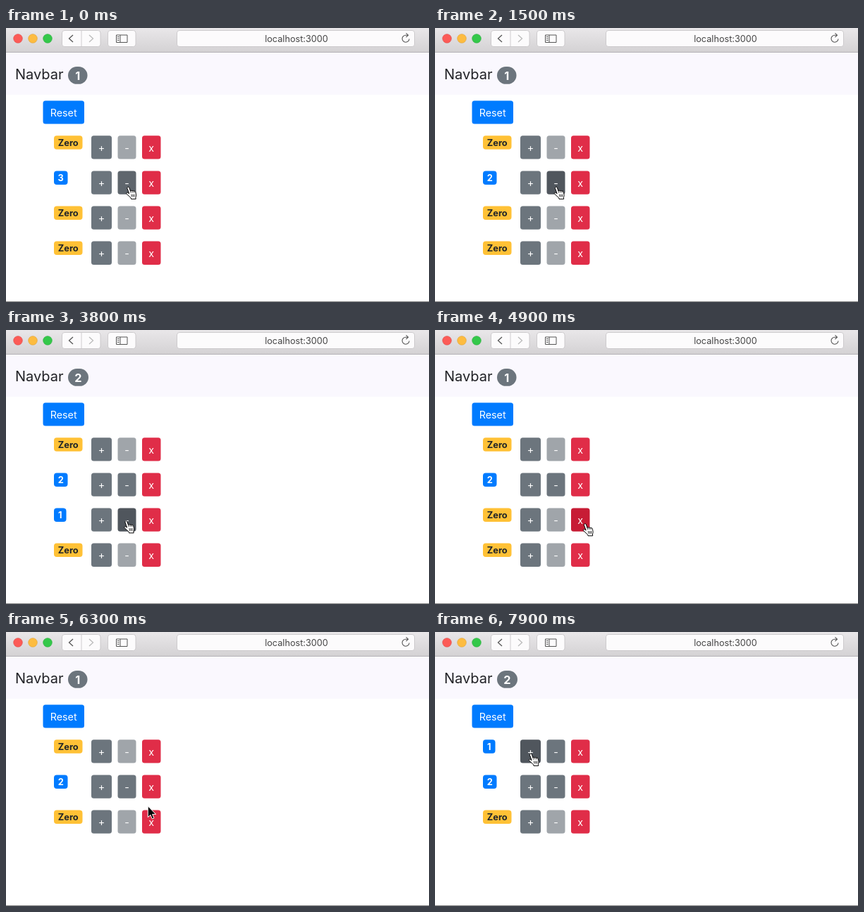
An HTML page that plays this animation: 600x390 px, repeating every 8 s.

```html
<!DOCTYPE html>
<html lang="en">
<head>
<meta charset="utf-8">
<title>Counters</title>
<style>
html, body { margin: 0; width: 100%; height: 100%; overflow: hidden; background: #fff; }
svg { display: block; width: 600px; height: 390px; font-family: Inter, sans-serif; cursor: default; }
.mid { text-anchor: middle; }
.btn { font-size: 14.3px; fill: #fff; text-anchor: middle; }
.bold { font-weight: 700; text-anchor: middle; }
.line { fill: none; stroke: #555; stroke-width: 1.3; }
</style>
</head>
<body>
<svg viewBox="0 0 600 390">
  <defs>
    <linearGradient id="bar" x2="0" y2="1">
      <stop stop-color="#e9e7e9"/><stop offset="1" stop-color="#d4d2d4"/>
    </linearGradient>
  </defs>
  <rect width="600" height="34" fill="url(#bar)"/>
  <rect y="34" width="600" height="1" fill="#b4b2b5"/>
  <g stroke-width=".6">
    <circle cx="17" cy="15" r="6.3" fill="#fc5b57" stroke="#de4744"/>
    <circle cx="38" cy="15" r="6.3" fill="#fdbc40" stroke="#dda034"/>
    <circle cx="59" cy="15" r="6.3" fill="#34c84a" stroke="#28ab3a"/>
  </g>
  <g fill="#fcfbfc" stroke="#c4c2c4" stroke-width=".8">
    <rect x="79.5" y="3.5" width="54.5" height="23" rx="3.5"/>
    <path d="M107 3.5v23"/>
    <rect x="144.5" y="3.5" width="39.5" height="23" rx="3.5"/>
    <rect x="242.5" y="3.5" width="337" height="23" rx="3.5"/>
  </g>
  <path class="line" d="M95 10l-5.5 5 5.5 5"/>
  <path class="line" d="M118 10l5.5 5-5.5 5" style="stroke:#bbb"/>
  <path class="line" d="M156.5 10h15.5v10.5h-15.5zM162 10v10.5M158 12.5h2.5M158 15h2.5M158 17.5h2.5" style="stroke-width:1"/>
  <path class="line" d="M572 15.5a5 5 0 1 1-5-5.3h3M567.5 7.3l3 2.9-3 2.9" style="stroke-width:1.1"/>
  <text class="mid" x="412" y="20" font-size="12.7" fill="#444">localhost:3000</text>

  <rect y="35" width="600" height="60" fill="#faf8fe"/>
  <text x="13" y="72.5" font-size="20" fill="#212226">Navbar</text>
  <rect x="52.5" y="103.5" width="58.5" height="33" rx="3.5" fill="#007bff"/>
  <text class="btn" x="81.7" y="125.8">Reset</text>
  <g id="live"></g>
  <rect y="389" width="600" height="1" fill="#858585"/>
  <g id="hand" stroke="#000" stroke-linejoin="round" stroke-linecap="round">
    <path fill="#fff" d="M-1.6 2C-2 .2 .6-.6 1.3 1.2L3 6c.6-1 2-.9 2.4 0 .6-.9 2-.6 2.4 .3 .8-.7 2-.2 2.3 .8 .9 2.8 1.5 5.2 .3 8.3l.3 2H4l-.3-1.6C2 14.5 .3 12.6-2 10.5c-1.7-1.3-.2-2.9 1.4-2l1.4 .9z"/>
    <path fill="none" stroke-width=".8" d="M3 6l.6 2.2M5.4 6l.5 2M7.8 6.3l.4 1.8M4.5 11l.4 3M6.6 11l.2 3M8.6 11v3"/>
  </g>
  <path id="arrow" fill="#000" stroke="#fff" stroke-linejoin="round" d="M0 0v16l3.7-3.4 2.4 5.6 2.6-1.1-2.4-5.4h5z"/>
</svg>
<script>
const LOOP = 8000;
const $ = id => document.getElementById(id);

// Pointer stops: time, x, y
const path = [
  [0, 173.5, 226], [900, 172, 226], [1750, 172, 226], [2300, 172, 268], [2550, 172, 268],
  [2900, 136, 271], [3300, 136, 271], [3600, 170.5, 271.5], [4100, 170.5, 271.5],
  [4700, 213, 275.5], [6050, 213, 275.5], [6800, 168, 169], [7050, 168, 169],
  [7400, 136, 173], [LOOP, 136, 173]
];

// Clicks: time, row, button index
const clicks = [[1250, 1, 1], [3100, 2, 0], [3900, 2, 1], [5100, 2, 2], [7700, 0, 0]];

const buttons = [
  { x: 121, w: 29, label: '+', fill: '#6c757d', hover: '#5f666d', press: '#50565d' },
  { x: 158.5, w: 26, label: '-', fill: '#6c757d', hover: '#5f666d', press: '#50565d' },
  { x: 193, w: 26.5, label: 'x', fill: '#e02d48', hover: '#c71c35', press: '#bd1a31' }
];

function pointerAt(t) {
  const i = path.findIndex(p => p[0] > t);
  const [t0, x0, y0] = path[i - 1], [t1, x1, y1] = path[i];
  const u = (t - t0) / (t1 - t0), e = u * u * (3 - 2 * u);
  return { x: x0 + (x1 - x0) * e, y: y0 + (y1 - y0) * e };
}

function countersAt(t) {
  const values = [0, 3, 0, 0];
  for (const [time, row, button] of clicks) {
    if (time > t) break;
    if (button === 2) values.splice(row, 1);
    else values[row] += button ? -1 : 1;
  }
  return values;
}

const box = (x, y, w, h, r, fill) =>
  `<rect x="${x}" y="${y}" width="${w}" height="${h}" rx="${r}" fill="${fill}"/>`;
const text = (cls, x, y, size, fill, label) =>
  `<text class="${cls}" x="${x}" y="${y}" style="font-size:${size}px;fill:${fill}">${label}</text>`;

function badge(value, y) {
  const w = value === 0 ? 40.5 : value === 1 ? 17.5 : 19.5;
  return box(68, y, w, 19.5, 4, value ? '#007bff' : '#ffc136') +
    text('bold', 68 + w / 2, y + 14.3, 12.8, value ? '#fff' : '#212529', value || 'Zero');
}

function draw(now) {
  const t = now % LOOP, p = pointerAt(t), values = countersAt(t);
  const pressed = clicks.some(([time]) => t > time - 120 && t < time + 300);
  const active = values.filter(v => v > 0).length;
  const pill = active === 1 ? 27.5 : 29;
  let over = false;
  let out = box(88, 55, pill, 24.8, 12.4, '#6c757d') +
    text('bold', 88 + pill / 2, 73.5, 16.3, '#fff', active);

  values.forEach((value, row) => {
    const y = 153.3 + row * 50.1;
    out += badge(value, y);
    buttons.forEach((b, i) => {
      const off = i === 1 && value === 0;
      const hit = !off && p.x >= b.x && p.x <= b.x + b.w && p.y >= y && p.y <= y + 33.3;
      over = over || hit;
      const fill = off ? '#a0a5aa' : !hit ? b.fill : pressed ? b.press : b.hover;
      out += box(b.x, y, b.w, 33.3, 3.5, fill) +
        text('btn', b.x + b.w / 2, y + 22.7, 14.3, '#fff', b.label);
    });
  });

  $('live').innerHTML = out;
  for (const id of ['hand', 'arrow']) {
    $(id).setAttribute('transform', `translate(${p.x} ${p.y})`);
    $(id).style.display = (id === 'hand') === over ? '' : 'none';
  }
}

const start = performance.now();
function tick() {
  draw(performance.now() - start);
  requestAnimationFrame(tick);
}
tick();
</script>
</body>
</html>
```
